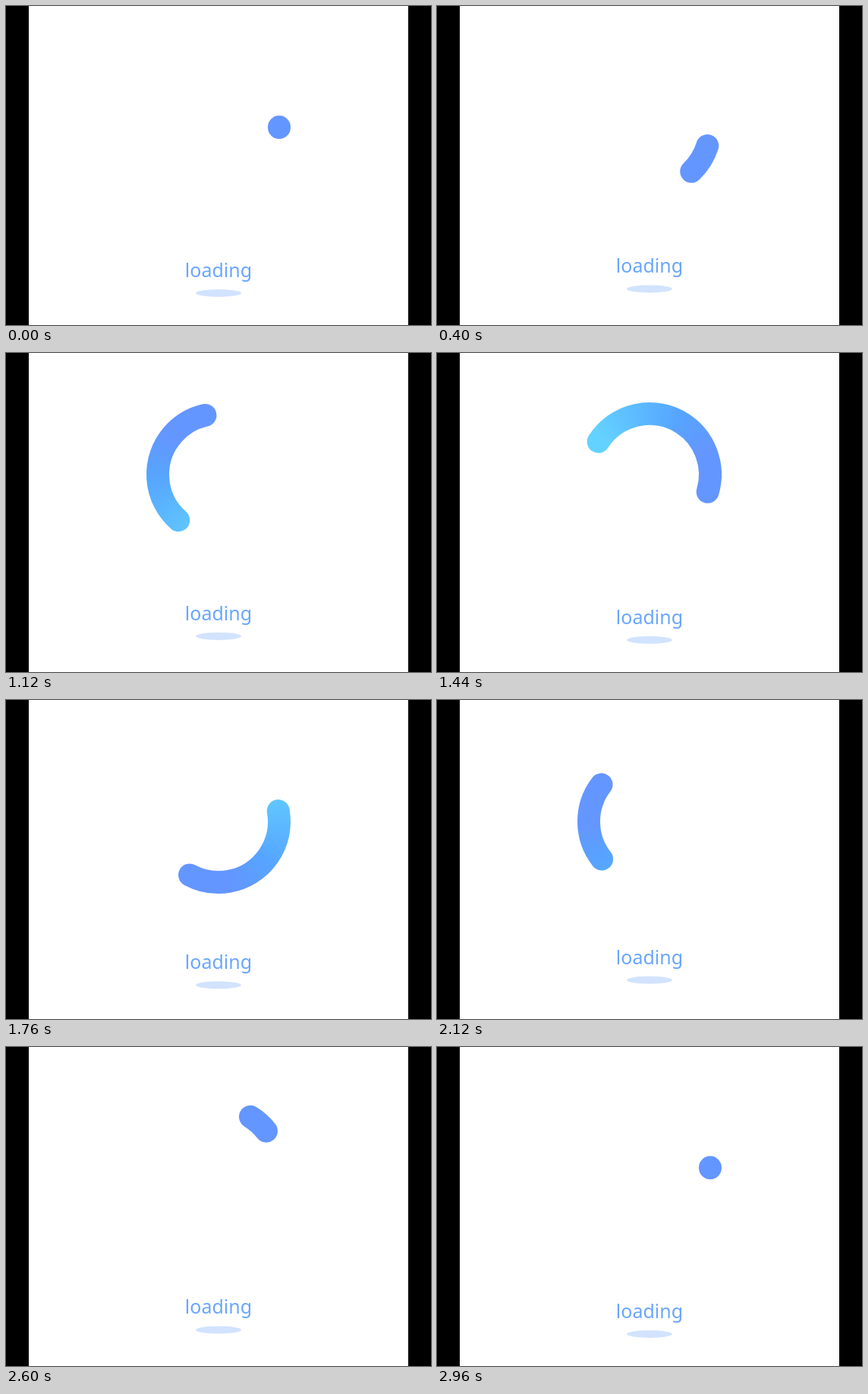
Write an HTML page with a canvas that moves like this. It is 560 by 420 pixels and loops after 3 s.

```html
<!DOCTYPE html>
<html>
<head>
<meta charset="utf-8">
<style>
html, body { margin: 0; width: 100%; height: 100%; overflow: hidden; background: #fff; }
canvas { display: block; }
</style>
</head>
<body>
<canvas id="stage" width="560" height="420"></canvas>
<script>
const ctx = document.getElementById('stage').getContext('2d');
const LOOP = 3000, STEP = 40, TAU = Math.PI * 2, RAD = Math.PI / 180;
const CX = 280, CY = 160, R = 80, WIDTH = 30;
const DARK = '#6496ff', MIDDLE = '#56a5ff', LIGHT = '#64d2ff';

// Ease in from rest: the larger k, the slower the start.
const ease = (x, k) => x * x * (1 + k) / (x + k);

// Two turns in degrees: ease in up to mid at half time, then ease out.
function turn(p, mid, k) {
  return p < 0.5
    ? mid * ease(2 * p, k)
    : 720 - (720 - mid) * ease(2 - 2 * p, 0.82);
}

function drawArc(p) {
  const head = turn(p, 400, 0.9);
  const tail = Math.min(turn(p, 230, 10), head - 0.5);
  // Colour depends on the distance in degrees behind the head.
  const paint = ctx.createConicGradient((head - 270) * RAD, CX, CY);
  const stop = (behind, color) => paint.addColorStop((270 - behind) / 360, color);
  stop(160, LIGHT);
  stop(80, MIDDLE);
  stop(40, DARK);
  ctx.strokeStyle = paint;
  ctx.lineWidth = WIDTH;
  ctx.lineCap = 'round';
  ctx.beginPath();
  ctx.arc(CX, CY, R, tail * RAD, head * RAD);
  ctx.stroke();
}

function drawLabel(p) {
  const lift = 5 * (1 - Math.cos(2 * TAU * p));
  ctx.fillStyle = '#d2e3ff';
  ctx.beginPath();
  ctx.ellipse(CX, 378 - lift, 30, 5, 0, 0, TAU);
  ctx.fill();
  ctx.fillStyle = '#6aa6ff';
  ctx.font = '25px "Noto Sans", "Open Sans", sans-serif';
  ctx.textAlign = 'center';
  ctx.fillText('loading', CX, 357 - lift);
}

function draw(now) {
  const p = Math.floor((now % LOOP) / STEP) * STEP / LOOP;
  ctx.fillStyle = '#000';
  ctx.fillRect(0, 0, 560, 420);
  ctx.fillStyle = '#fff';
  ctx.fillRect(30, 0, 500, 420);
  drawArc(p);
  drawLabel(p);
}

const begin = performance.now();
function frame() {
  draw(performance.now() - begin);
  requestAnimationFrame(frame);
}
frame();
</script>
</body>
</html>
```
